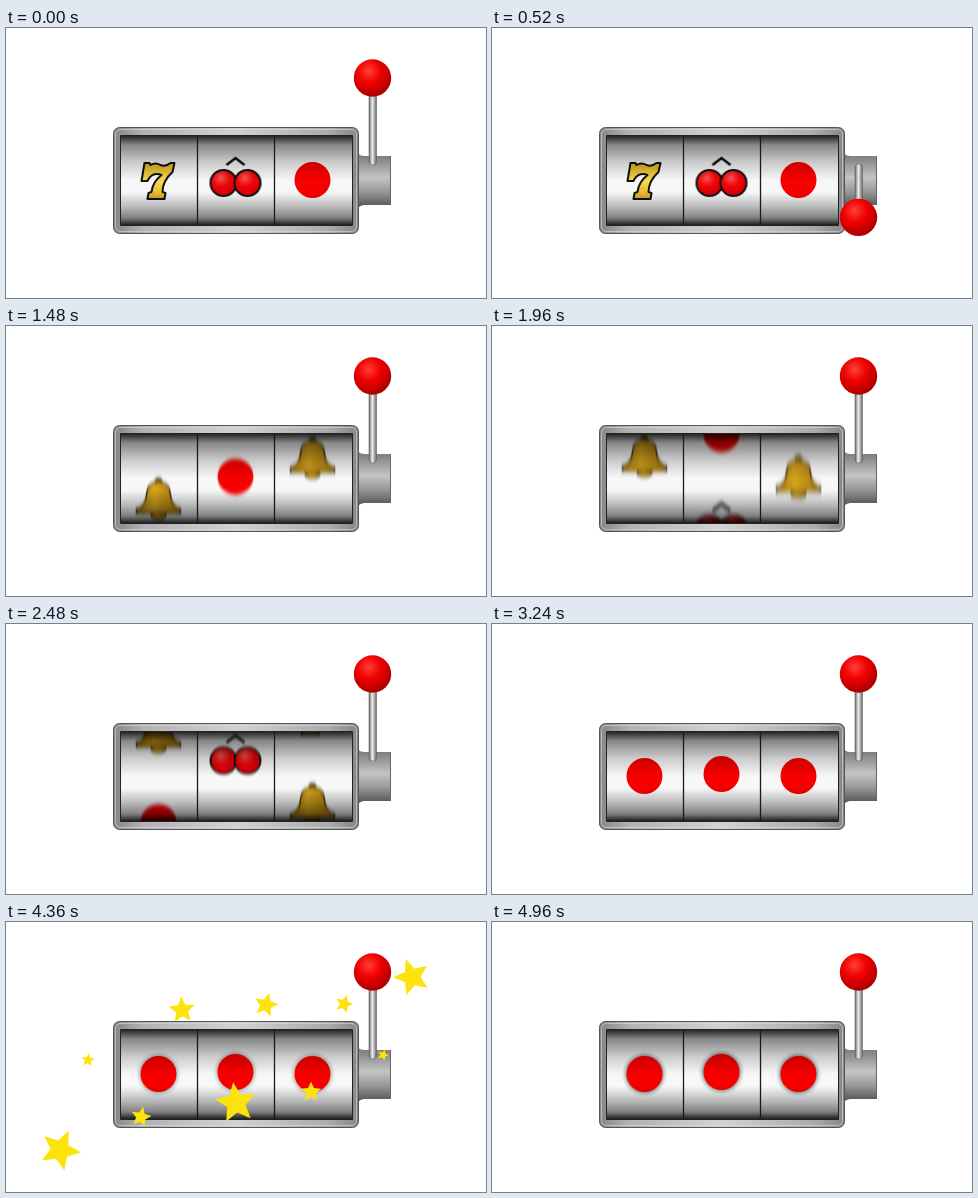
Animation, 480 px wide and 270 px high, one loop 5000 ms. Source, as an HTML page:

```html
<!DOCTYPE html>
<html lang="en">
<head>
<meta charset="utf-8">
<title>Slot machine</title>
<style>
html, body { margin: 0; width: 100%; height: 100%; overflow: hidden; background: #fff; }
svg { display: block; width: 100%; height: 100%; }
</style>
</head>
<body>
<svg viewBox="0 0 480 270">
  <defs>
    <linearGradient id="steel">
      <stop offset="0" stop-color="#858585"/><stop offset=".12" stop-color="#b2b2b2"/>
      <stop offset=".5" stop-color="#d2d2d2"/><stop offset=".88" stop-color="#aaa"/>
      <stop offset="1" stop-color="#858585"/>
    </linearGradient>
    <linearGradient id="hub" x2="0" y2="1">
      <stop offset="0" stop-color="#666"/><stop offset=".2" stop-color="#8c8c8c"/>
      <stop offset=".45" stop-color="#c4c4c4"/><stop offset=".65" stop-color="#999"/>
      <stop offset=".88" stop-color="#555"/><stop offset="1" stop-color="#aaa"/>
    </linearGradient>
    <linearGradient id="rod">
      <stop offset="0" stop-color="#666"/><stop offset=".45" stop-color="#eee"/>
      <stop offset="1" stop-color="#666"/>
    </linearGradient>
    <linearGradient id="shade" x2="0" y2="1">
      <stop offset="0" stop-opacity=".85"/><stop offset=".1" stop-opacity=".47"/>
      <stop offset=".3" stop-opacity=".2"/><stop offset=".5" stop-opacity=".03"/>
      <stop offset=".63" stop-opacity=".03"/><stop offset=".8" stop-opacity=".28"/>
      <stop offset=".92" stop-opacity=".5"/><stop offset="1" stop-opacity=".88"/>
    </linearGradient>
    <linearGradient id="gold" x2="0" y2="1">
      <stop offset="0" stop-color="#e9b820"/><stop offset=".5" stop-color="#ffdf55"/>
      <stop offset="1" stop-color="#e5b02a"/>
    </linearGradient>
    <linearGradient id="brass">
      <stop offset="0" stop-color="#a87808"/><stop offset=".4" stop-color="#dcaa20"/>
      <stop offset="1" stop-color="#a87808"/>
    </linearGradient>
    <radialGradient id="red" cx=".4" cy=".32" r=".7">
      <stop offset="0" stop-color="#ff4038"/><stop offset=".45" stop-color="#f00000"/>
      <stop offset="1" stop-color="#a80000"/>
    </radialGradient>
    <radialGradient id="fruit" cx=".4" cy=".3" r=".65">
      <stop offset="0" stop-color="#ff5a55"/><stop offset=".5" stop-color="#f8070c"/>
      <stop offset="1" stop-color="#dc0008"/>
    </radialGradient>
    <filter id="soft" x="-50%" y="-50%" width="200%" height="200%"><feGaussianBlur stdDeviation="2"/></filter>
    <clipPath id="window"><path d="M115 108H346V197H115Z"/></clipPath>

    <path id="seven" fill="url(#gold)" stroke="#111" stroke-width="2" stroke-linejoin="round"
      d="M-14-17L-9-17L-8-15Q-3-18 2-15Q7-13 12-17L16-17L14-8Q4 1 4 12L7 13L6 19L-11 19L-10 13L-7 12Q-6 2 3-5Q-5-8-10-1L-11 1L-17 1Z"/>
    <g id="bell" stroke="#332400" stroke-width="1.5">
      <ellipse cy="15" rx="7.5" ry="5" fill="url(#brass)"/>
      <circle cy="-17" r="3.5" fill="#5b430a"/>
      <path fill="url(#brass)" d="M-22 14V10Q-13 7-12-4Q-11-17 0-17T12-4Q13 7 22 10V14Z"/>
    </g>
    <circle id="badge" r="18" fill="#f00"/>
    <g id="cherry" stroke="#111" stroke-width="2">
      <path fill="none" stroke-width="2.5" d="M-9-13L0-20L9-13"/>
      <circle cx="-12" cy="5" r="13" fill="url(#fruit)"/>
      <circle cx="12" cy="5" r="13" fill="url(#fruit)"/>
    </g>
  </defs>

  <path d="M347 119Q352 128 358 128H385V177H358Q352 177 347 187Z" fill="url(#hub)"/>
  <path d="M384.5 128V177" stroke="#666"/>
  <rect x="107.5" y="99.5" width="245" height="106" rx="6" fill="url(#steel)" stroke="#555"/>
  <rect x="109.500" y="101.500" width="241" height="102" rx="5" fill="none" stroke="#ddd" opacity=".6"/>
  <rect x="114" y="107" width="233" height="91" rx="1" fill="#222"/>
  <g clip-path="url(#window)">
    <path d="M115 108H346V197H115Z" fill="#fff"/>
    <g id="reels"></g>
    <path d="M115 108H346V197H115Z" fill="url(#shade)"/>
    <path d="M191.500 107V198M268.500 107V198" stroke="#1a1a1a" stroke-width="1.3"/>
  </g>
  <rect id="stem" x="363" width="7.500" rx="3.500" fill="url(#rod)" stroke="#666" stroke-width=".6"/>
  <circle id="ball" cx="366.500" r="18.700" fill="url(#red)"/>
  <g id="stars" fill="#fbe30b"></g>
</svg>
<script>
const LOOP = 5000, PITCH = 90;
const $ = id => document.getElementById(id);
const strip = ['seven', 'bell', 'badge', 'cherry'];

// Keys are [time ms, symbols travelled, symbols per second].
const reels = [
  { x: 152.5, y: 152, first: 0, keys: [[600, 0, 0], [1480, 3.23, 6.5], [2480, 10.51, 6.2], [3200, 14, 0]] },
  { x: 229.5, y: 150, first: 3, keys: [[600, 0, 0], [1480, 5, 7], [2480, 11.79, 4.8], [2960, 13, 0]] },
  { x: 306.5, y: 152, first: 2, keys: [[600, 0, 0], [1480, 4.77, 8], [2480, 13.31, 7], [3120, 16, 0]] }
];

// x, y, time of full size, tilt
const stars = [
  [70, 90, 3700, 10], [392, 215, 3720, 30], [230, 60, 3760, 50],
  [300, 29, 3920, 0], [160, 236, 3920, 20], [420, 200, 4040, 40],
  [176, 88, 4195, -4], [260, 83, 4183, 14], [338, 82, 4149, 18],
  [406, 55, 4274, -19], [54, 228, 4360, 24], [230, 181, 4360, -8],
  [305, 170, 4560, 0], [135, 195, 4560, 12], [82, 138, 4597, 8],
  [377, 133, 4607, 20], [427, 170, 4660, 0], [48, 90, 4660, 30], [250, 213, 4660, 5]
];
const STAR_LIFE = 300, STAR_SIZE = 21;

const starPoints = Array.from({ length: 10 }, (_, k) => {
  const r = k % 2 ? 0.46 : 1, a = k * Math.PI / 5;
  return [r * Math.sin(a), -r * Math.cos(a)].map(n => n.toFixed(3));
}).join(' ');

$('reels').innerHTML = reels.map((reel, n) => `
  <filter id="blur${n}" filterUnits="userSpaceOnUse" x="-40" y="-200" width="80" height="400">
    <feGaussianBlur stdDeviation="0 0"/></filter>
  <g transform="translate(${reel.x} ${reel.y})">
    <circle class="glow" r="19" filter="url(#soft)"/>
    <g filter="url(#blur${n})">${strip.map(s => `<use href="#${s}"/>`).join('')}</g>
  </g>`).join('');
$('stars').innerHTML = stars.map(() => `<polygon points="${starPoints}"/>`).join('');

const symbols = [...document.querySelectorAll('#reels use')];
const blurs = [...document.querySelectorAll('#reels feGaussianBlur')];
const glows = [...document.querySelectorAll('.glow')];
const starNodes = [...$('stars').children];

const clamp = n => Math.min(1, Math.max(0, n));
const ease = n => (1 - Math.cos(Math.PI * clamp(n))) / 2;
const mod = (n, m) => ((n % m) + m) % m;

function travel(keys, t) {
  if (t <= keys[0][0]) return 0;
  const j = keys.findIndex(k => t < k[0]);
  if (j < 0) return keys.at(-1)[1];
  const [t0, p0, v0] = keys[j - 1], [t1, p1, v1] = keys[j];
  const span = (t1 - t0) / 1000, u = (t - t0) / (t1 - t0), w = 1 - u;
  return p0 * (1 + 2 * u) * w * w + v0 * span * u * w * w
    + p1 * (3 - 2 * u) * u * u - v1 * span * w * u * u;
}

function draw(t) {
  const ballY = 50 + 169 * (ease(t / 400) - ease((t - 400) / 440));
  const top = Math.min(ballY, 136);
  $('ball').setAttribute('cy', ballY);
  $('stem').setAttribute('y', top);
  $('stem').setAttribute('height', Math.max(ballY, 137) - top);

  reels.forEach(({ first, keys }, n) => {
    const pos = travel(keys, t);
    const speed = (travel(keys, t + 10) - travel(keys, t - 10)) * 50;
    blurs[n].setAttribute('stdDeviation', `0 ${(Math.max(0, speed) * 0.33).toFixed(2)}`);
    strip.forEach((_, i) => {
      const y = (mod(i - first + pos + 2, 4) - 2) * PITCH;
      symbols[n * 4 + i].setAttribute('y', y.toFixed(2));
    });
    glows[n].setAttribute('opacity', 0.55 * clamp((t - 3400) / 1500));
  });

  stars.forEach(([x, y, peak, tilt], i) => {
    const age = (t - peak) / STAR_LIFE;
    const size = Math.abs(age) < 1 ? STAR_SIZE * Math.cos(age * Math.PI / 2) : 0;
    const angle = tilt + (t - 4360) * 0.08;
    starNodes[i].setAttribute('transform', `translate(${x} ${y}) rotate(${angle}) scale(${size})`);
  });
}

const start = performance.now();
function tick() {
  draw((performance.now() - start) % LOOP);
  requestAnimationFrame(tick);
}
tick();
</script>
</body>
</html>
```
